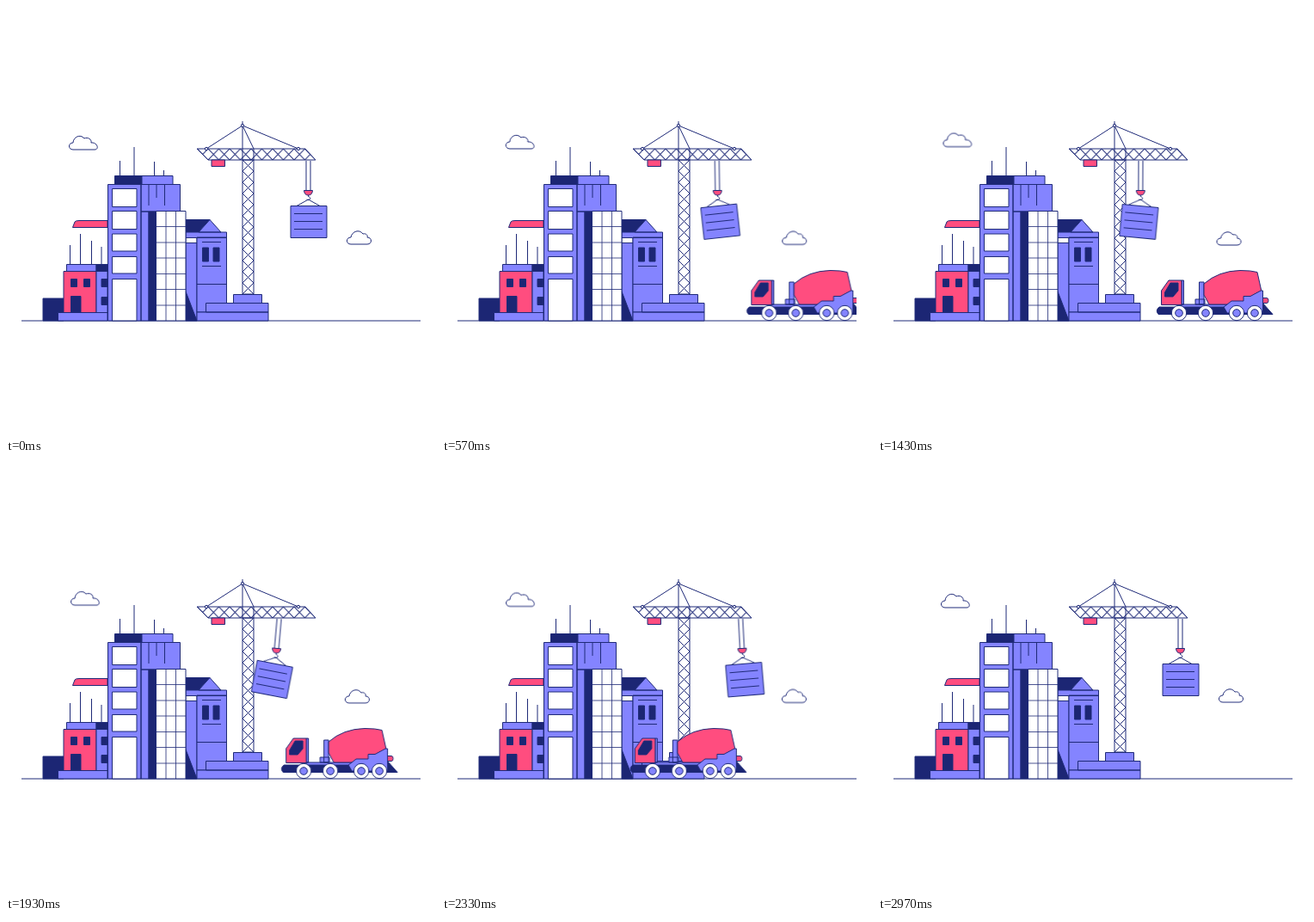
An HTML page without scripts for the animation above (3.03 s loop, 500 by 500 pixels).

```html
<!DOCTYPE html>
<html lang="en">
<head>
<meta charset="utf-8">
<title>Construction site</title>
<style>
html, body { margin: 0; width: 100%; height: 100%; overflow: hidden; background: #fff; }
svg { display: block; width: 100vw; height: 100vh; }
.art { stroke: #1f2a78; stroke-width: 1; stroke-linejoin: round; fill: none; }
.b { fill: #8484ff; }
.n { fill: #1c2674; }
.p { fill: #ff4d7f; }
.w { fill: #fff; }

.cloud-l, .cloud-r, .trolley, .rope, .block, .truck, .body {
  animation: 3030ms ease-in-out infinite;
}
.cloud-l { animation-name: cloud-l; }
.cloud-r { animation-name: cloud-r; }
.trolley { animation-name: trolley; }
.rope { animation-name: rope; transform-origin: 351.5px 180px; }
.block { animation-name: block; transform-origin: 351.5px 225px; }
.truck { animation-name: truck; }
.body { animation-name: body; transform-origin: 390px 354px; }

@keyframes cloud-l { 50% { transform: translate(2.5px, -3.4px); } }
@keyframes cloud-r { 50% { transform: translate(-2.5px, 1px); } }
@keyframes trolley {
  0%, 83.5%, 100% { transform: none; }
  30.7%, 52.8% { transform: translateX(-46px); }
}
@keyframes rope {
  0%, 98%, 100% { transform: rotate(0deg); }
  10.6% { transform: rotate(-5deg); }
  30.7% { transform: rotate(7deg); }
  47.2%, 52.8% { transform: rotate(.3deg); }
  63% { transform: rotate(5deg); }
  79.2% { transform: rotate(-3.3deg); }
}
@keyframes block {
  0%, 98%, 100% { transform: rotate(0deg); }
  16.5% { transform: rotate(-6deg); }
  32% { transform: rotate(7.5deg); }
  47.2% { transform: rotate(5deg); }
  63.7% { transform: rotate(6deg); }
  79.2% { transform: rotate(-2.2deg); }
}
@keyframes truck {
  0% { transform: translateX(165px); animation-timing-function: cubic-bezier(.333, .667, .667, 1); }
  33% { transform: translateX(0); }
  60.6% { transform: translateX(0); animation-timing-function: cubic-bezier(.333, 0, .667, .333); }
  98%, 100% { transform: translateX(-552px); }
}
@keyframes body {
  0%, 18%, 47%, 100% { transform: rotate(0deg); }
  32% { transform: rotate(-1deg); }
}
</style>
</head>
<body>
<svg viewBox="0 0 500 500">
  <defs>
    <pattern id="jib" patternUnits="userSpaceOnUse" x="235" y="166" width="12.5" height="13">
      <path class="art" d="M0 0L12.5 13M12.5 0L0 13"/>
    </pattern>
    <pattern id="mast" patternUnits="userSpaceOnUse" x="275" y="179" width="13" height="13">
      <path class="art" d="M0 0L13 13M13 0L0 13"/>
    </pattern>
    <clipPath id="road"><rect x="18" y="280" width="464" height="90"/></clipPath>
    <g id="wheel">
      <circle class="w" r="8.7"/>
      <circle class="b" r="4.3"/>
    </g>
  </defs>

  <g class="art">
    <path class="cloud-l w" d="M78 167c-6 0-6-8 0-8c0-6 8-11 13-5c4-2 9 1 8 5c7-1 10 8 4 8z"/>
    <path class="cloud-r w" d="M401 277c-6 0-6-8 0-8c1-7 10-10 14-4c4-1 6 2 5 4c6 0 6 8 0 8z"/>
    <path d="M18 366H482"/>

    <!-- low block -->
    <path class="n" d="M43 340H67V366H43z"/>
    <path class="b" d="M60.5 356.5H118V366H60.5z"/>
    <path class="p" d="M67 308.5H105V356.5H67z"/>
    <path class="b" d="M105 308.5H118V356.5H105z"/>
    <path class="n" d="M75.5 317.5h7v9h-7zM90.5 317.5h7v9h-7zM75.5 337.5H87V356H75.5zM111 317.5h7v9h-7zM111 338.5h7v9h-7z"/>
    <path class="b" d="M70.5 300.5H105V308.5H70.5z"/>
    <path class="n" d="M105 300.5H118V308.5H105z"/>
    <path d="M74.5 278V300M86.500 265V300M99.500 273V300M111 280V300"/>
    <path class="p" d="M77.500 257.500L80 251Q81 249.500 85 249.500H118V257.500z"/>

    <!-- house -->
    <path class="b" d="M209 275.500H222V366H209z"/>
    <path class="w" d="M209 269.500H222V275.500H209z"/>
    <path class="n" d="M209 332L222 366H209zM209 248.500H237L224 263H209z"/>
    <path class="b" d="M237 248.500L250 263H224zM222 269H256.500V356H222zM209 263H256.500V269.500H209z"/>
    <path class="n" d="M228.500 281h7v16h-7zM241 281h7v16h-7z"/>
    <path d="M228 274.500H250M228 302.500H250M222 323.500H256"/>

    <!-- tower -->
    <path class="b" d="M118.500 207.500H157V366H118.500zM157 207.500H202.500V239H157zM157 239H166V366H157z"/>
    <path class="n" d="M166 239H174.500V366H166z"/>
    <path class="w" d="M123.500 212.500H152V233.500H123.500zM123.500 238.500H152V259.500H123.500zM123.500 265H152V285H123.500zM123.500 291.500H152V311H123.500zM123.500 317.500H152V366H123.500z"/>
    <path class="w" d="M174.500 238.500H209V366H174.500z"/>
    <path stroke-width=".8" d="M186 238V366M197.500 238V366M174 256.500H209M174 275H209M174 293H209M174 311.500H209M174 329.500H209M174 348H209"/>
    <path d="M166 207V232M175 207V223M184.500 207V232"/>
    <path class="n" d="M126.500 197.500H158V207.500H126.500z"/>
    <path class="b" d="M158 197.500H194V207.500H158z"/>
    <path d="M132.500 180V197M149 164V197M172.500 181V197M183.500 191V197"/>

    <!-- crane -->
    <path class="b" d="M222 356H305V366H222zM232.500 345.500H305V356H232.500zM264.500 335.500H297.500V345.500H264.500z"/>
    <path fill="url(#mast)" d="M275 179H288V335H275z"/>
    <path fill="url(#jib)" d="M222 166H348L360 179H235z"/>
    <path d="M275 134V179M275 139L288 166V179M275 139L233 166M275 139L340 166"/>
    <g class="w">
      <circle cx="275" cy="139" r="1.700"/>
      <circle cx="233" cy="166" r="1.700"/>
      <circle cx="340" cy="166" r="1.700"/>
    </g>
    <path class="p" d="M239 179H254.500V186.500H239z"/>

    <g class="trolley">
      <g class="rope">
        <path d="M349 180V215M354 180V215"/>
        <path class="p" d="M346.500 214.500H356.500Q356 220 351.500 220T346.500 214.500z"/>
        <path d="M351.500 220V221.500C356 223 353 227 349.500 225"/>
        <g class="block">
          <path d="M338 232.500L351.500 225L365 232.500"/>
          <path class="b" d="M331 232.500H373V269.500H331z"/>
          <path d="M335 241.500H368M335 250.500H368M335 259.500H368"/>
        </g>
      </g>
    </g>

    <!-- mixer truck -->
    <g clip-path="url(#road)">
      <g class="truck">
        <g class="body">
          <path class="n" d="M327 350H412L447 345L459 358.500H326Q322 354 327 350z"/>
          <path class="b" d="M353 347H410V350H353zM353 319H355.500V347H353zM369 341H380V347H369zM373.500 321H379V347H373.500z"/>
          <path class="p" d="M329.500 347.500V331L338 319H353V347.500z"/>
          <path class="n" d="M333.500 338V333L340 322H349V331L343 338z"/>
          <path class="p" d="M447 339.500H452Q454 339.500 454 342.500T452 345.500H447z"/>
          <path class="p" d="M379 323Q396 308 421 307.500Q434 307.500 441 309.500L446 332L425 344L406 347H385L379 336z"/>
          <path class="b" d="M402 350L406 347L411 343H425V337.500H433L445 331H447.500V357H406z"/>
        </g>
        <use href="#wheel" x="350" y="357"/>
        <use href="#wheel" x="381" y="357"/>
        <use href="#wheel" x="417" y="357"/>
        <use href="#wheel" x="438" y="357"/>
      </g>
    </g>
  </g>
</svg>
</body>
</html>
```
